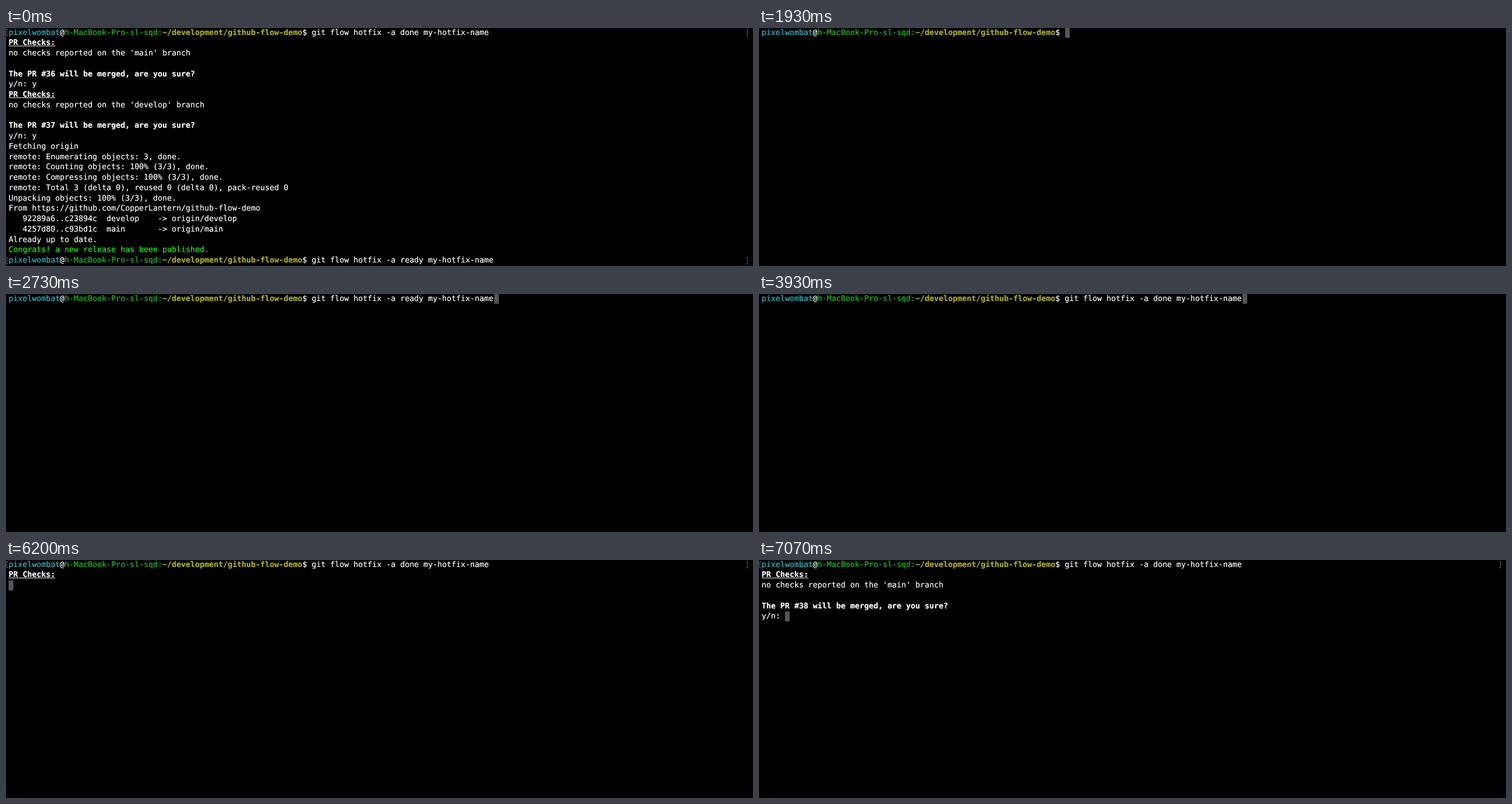
These frames come from a looping animation (1280 by 408 pixels, 8000 ms). An HTML page:

```html
<!DOCTYPE html>
<html lang="en">
<head>
<meta charset="utf-8">
<title>Terminal session</title>
<style>
  html, body { margin: 0; width: 100%; height: 100%; overflow: hidden; background: #000; }
  #term { position: absolute; left: 0; top: 0; width: 1280px; height: 408px; overflow: hidden; }
  .row {
    position: absolute; left: 0; top: 0; color: #fff; white-space: pre;
    font: 13.288px/17.75px "DejaVu Sans Mono", monospace;
    text-rendering: geometricPrecision; -webkit-text-stroke: 0.2px;
  }
  .user { color: #33bbc8; }
  .host { color: #25bc24; }
  .path { color: #adad27; font-weight: bold; }
  .ok { color: #31e722; }
  u { font-weight: bold; text-underline-offset: 1px; text-decoration-thickness: 1px; }
  #cursor { position: absolute; left: 0; top: 0; width: 8px; height: 17.4px; background: #565656; }
  .mark { position: absolute; box-sizing: border-box; width: 3px; height: 12px; border: 1px solid #5c5c5c; }
  .open { left: 1px; border-right: 0; }
  .close { left: 1268px; border-left: 0; }
</style>
</head>
<body>
<div id="term"></div>
<script>
const LOOP = 8000, CELL = 8, ROW = 17.75, LEFT = 4.5, TOP = -0.4, PROMPT_COLS = 65;
const term = document.getElementById('term');

const prompt = cmd => '<span class="user">pixelwombat</span>@<span class="host">h-MacBook-Pro-sl-sqd:</span>' +
  '<span class="path">~/development/github-flow-demo</span>$ ' + cmd;
const hotfix = action => `git flow hotfix -a ${action} my-hotfix-name`;
const title = '<u>PR Checks:</u>';
const check = (branch, pr, answer) => [
  title,
  `no checks reported on the '${branch}' branch`,
  '',
  `<b>The PR #${pr} will be merged, are you sure?</b>`,
  'y/n: ' + answer
];

const done = prompt(hotfix('done'));
const finished = [
  done,
  ...check('main', 36, 'y'),
  ...check('develop', 37, 'y'),
  'Fetching origin',
  'remote: Enumerating objects: 3, done.',
  'remote: Counting objects: 100% (3/3), done.',
  'remote: Compressing objects: 100% (3/3), done.',
  'remote: Total 3 (delta 0), reused 0 (delta 0), pack-reused 0',
  'Unpacking objects: 100% (3/3), done.',
  'From https://github.com/CopperLantern/github-flow-demo',
  '   92289a6..c23894c  develop    -&gt; origin/develop',
  '   4257d80..c93bd1c  main       -&gt; origin/main',
  'Already up to date.',
  '<span class="ok">Congrats! a new release has been published.</span>',
  prompt(hotfix('ready'))
];

// A command still being edited: cursor after its last character, no marks
const edit = (at, cmd) => ({ at, lines: [prompt(cmd)], cursor: [PROMPT_COLS + cmd.length, 0], marks: [] });

const steps = [
  { at: 0, lines: finished, marks: [0, 22] },
  edit(1930, ''),
  edit(2470, 'clear'),
  edit(2730, hotfix('ready')),
  edit(3930, hotfix('done')),
  { at: 5000, lines: [done], cursor: [0, 1], marks: [0] },
  { at: 6200, lines: [done, title], cursor: [0, 2], marks: [0] },
  { at: 7070, lines: [done, ...check('main', 38, '')], cursor: [5, 5], marks: [0] }
];

// Transforms keep the fractional cell positions
const place = (col, row) => `style="transform:translate(${LEFT + col * CELL}px,${TOP + row * ROW}px)"`;

function render({ lines, cursor, marks }) {
  let html = cursor ? `<div id="cursor" ${place(...cursor)}></div>` : '';
  lines.forEach((line, i) => {
    html += `<div class="row" ${place(0, i)}>${line}</div>`;
  });
  for (const row of marks) {
    for (const side of ['open', 'close']) {
      html += `<div class="mark ${side}" style="top:${Math.round(row * ROW + 2)}px"></div>`;
    }
  }
  term.innerHTML = html;
}

let shown;
function frame() {
  const t = performance.now() % LOOP;
  const step = steps.findLast(s => s.at <= t);
  if (step !== shown) render(shown = step);
  requestAnimationFrame(frame);
}
frame();
</script>
</body>
</html>
```
